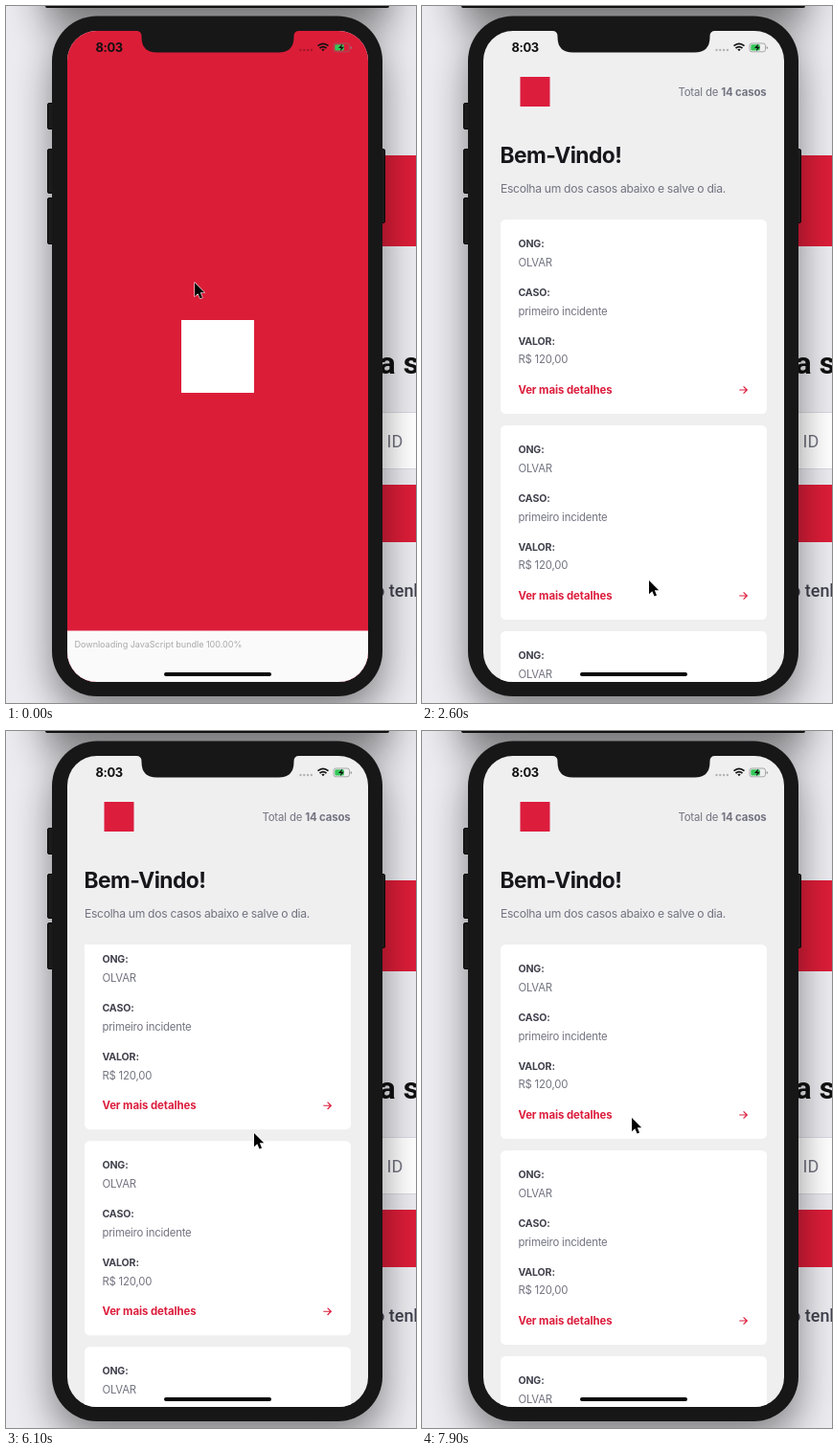
These frames come from a looping animation (428x728 px, 8000 ms). An HTML page:

```html
<!DOCTYPE html>
<html lang="pt">
<head>
<meta charset="utf-8">
<title>App de casos</title>
<style>
  html, body { margin: 0; width: 100%; height: 100%; overflow: hidden; background: #ebebf0; }
  svg { display: block; width: 428px; height: 728px; }
  text { font-family: Inter, "Noto Sans", sans-serif; white-space: pre; }
  .web { font-family: Roboto, sans-serif; }
  .label { font-size: 10.6px; font-weight: 700; letter-spacing: -.15px; fill: #41414d; }
  .value { font-size: 11.37px; letter-spacing: -.2px; fill: #737380; }
  .total { font-size: 11.37px; letter-spacing: -.14px; fill: #737380; text-anchor: end; }
  .link { font-size: 11.37px; font-weight: 700; letter-spacing: -.05px; fill: #dc1d3c; }
  .title { font-size: 22.75px; font-weight: 700; letter-spacing: -.55px; fill: #16161b; }
  .intro { font-size: 12.13px; letter-spacing: -.3px; fill: #737380; }
  .clock { font-size: 12.9px; font-weight: 700; letter-spacing: -.35px; fill: #111; }
  .note { font-size: 9.1px; letter-spacing: -.05px; fill: #a9a9a9; }
  .toast { text-anchor: middle; fill: #e4e4e4; }
</style>
</head>
<body>
<svg viewBox="0 0 428 728">
  <defs>
    <filter id="soft" x="-40%" y="-40%" width="180%" height="180%"><feGaussianBlur stdDeviation="20"/></filter>
    <clipPath id="screen"><rect x="64" y="26" width="314" height="680" rx="31"/></clipPath>
    <clipPath id="window"><rect x="64" y="223" width="314" height="483"/></clipPath>
  </defs>

  <!-- page behind the phone -->
  <rect width="428" height="728" fill="#ebebf0"/>
  <rect x="380" y="156" width="95" height="95" fill="#dc1d38"/>
  <text class="web" x="389.5" y="384" font-size="32" font-weight="700" fill="#111">a seu logon</text>
  <rect x="300" y="424.5" width="160" height="59" fill="#fff" stroke="#d8d8e0"/>
  <text class="web" x="397.5" y="461" font-size="18" fill="#737380">ID</text>
  <rect x="300" y="500" width="160" height="60" fill="#dc1d38"/>
  <text class="web" x="385" y="617" font-size="18" font-weight="500" fill="#41414d">o tenho cadastro</text>

  <!-- shadows of the window above and of the phone -->
  <rect x="41" y="-200" width="359" height="222" fill="#000" opacity=".5" filter="url(#soft)"/>
  <rect x="48" y="28" width="345" height="712" rx="47" fill="#000" opacity=".45" filter="url(#soft)"/>
  <rect x="41" y="-6" width="359" height="8" rx="2" fill="#111"/>

  <!-- phone body -->
  <g fill="#1b1b1c" stroke="#080808">
    <rect x="43.5" y="101.5" width="8" height="27" rx="1.5"/>
    <rect x="43.5" y="149.5" width="8" height="46" rx="1.5"/>
    <rect x="43.5" y="200.5" width="8" height="48" rx="1.5"/>
    <rect x="388" y="149.5" width="7.5" height="77" rx="1.5"/>
  </g>
  <rect x="48" y="10.5" width="345" height="710.5" rx="47" fill="#171718"/>

  <g clip-path="url(#screen)">
    <rect x="64" y="26" width="314" height="680" fill="#efeff0"/>
    <rect x="102.5" y="74" width="31" height="31" fill="#dc1d3c"/>
    <text class="total" x="359.5" y="94">Total de <tspan font-weight="700">14 casos</tspan></text>
    <text class="title" x="81.5" y="163.6">Bem-Vindo!</text>
    <text class="intro" x="82" y="194.5">Escolha um dos casos abaixo e salve o dia.</text>
    <g clip-path="url(#window)"><g id="list"></g></g>

    <g id="toast">
      <rect x="82" y="642" width="278" height="64" fill="#000" opacity=".77"/>
      <text class="toast" x="220.8" y="661" font-size="11.37" letter-spacing="-.2">Refreshed</text>
      <text class="toast" x="221" y="674" font-size="10.1">Don't see your changes? Reload the app</text>
    </g>

    <g id="splash">
      <rect x="64" y="26" width="314" height="680" fill="#dc1d38"/>
      <rect x="183" y="328" width="76" height="76" fill="#fff"/>
      <rect x="64" y="652.5" width="314" height="54" fill="#fafafa"/>
      <text class="note" x="71.5" y="670">Downloading JavaScript bundle 100.00%</text>
    </g>
    <rect id="home" x="165" y="696" width="112" height="4" rx="2"/>

    <!-- status bar -->
    <path d="M136 26q5.5 0 5.5 5.5v1q0 16 16 16h127q16 0 16-16v-1q0-5.500 5.5-5.500z" fill="#171718"/>
    <text class="clock" x="93.5" y="47.5">8:03</text>
    <g id="dots"></g>
    <path d="M325.5 41.7q5.5-4.600 11 0M327.5 44q3.5-2.900 7 0" fill="none" stroke="#111" stroke-width="1.7"/>
    <path d="M329.3 45.3L331 47.3L332.7 45.3q-1.700-1.300-3.400 0z" fill="#111"/>
    <rect x="342" y="39" width="16.5" height="8.8" rx="2.3" fill="none" stroke="#777" stroke-opacity=".75" stroke-width=".8"/>
    <path d="M359.7 42v3q1.2-.5 1.2-1.500t-1.200-1.500z" fill="#888"/>
    <rect x="343.3" y="40.3" width="9.5" height="6.2" rx="1.2" fill="#35c759"/>
    <path d="M351 39.5L347 44h2.7l-.8 3.3L353 42.8h-2.700z" fill="#111"/>
  </g>

  <path id="cursor" d="M0 0V14.2L3.3 11.2L5.6 16.4L8 15.4L5.8 10.3H10.2Z"
        stroke="#fff" stroke-width="1.1" stroke-linejoin="round" paint-order="stroke"/>
</svg>

<script>
  const LOOP = 8000, TICK = 100, CARDS = 5, PITCH = 215;
  const el = id => document.getElementById(id);
  const repeat = (n, draw) => Array.from({ length: n }, (_, i) => draw(i)).join("");

  const fields = { "ONG:": "OLVAR", "CASO:": "primeiro incidente", "VALOR:": "R$ 120,00" };
  const rows = Object.entries(fields).map(([label, value], i) => `
    <text class="label" x="100.4" y="${29 + 51 * i}">${label}</text>
    <text class="value" x="100.4" y="${48.6 + 50.9 * i}">${value}</text>`).join("");

  el("list").innerHTML = repeat(CARDS, i => `
    <g transform="translate(0 ${223 + i * PITCH})">
      <rect x="82" width="278" height="203" rx="5.5" fill="#fff"/>${rows}
      <text class="link" x="100.4" y="182">Ver mais detalhes</text>
      <path class="arrow" d="M331.3 178h8m-3.700-3.700l3.700 3.700l-3.700 3.700"
        fill="none" stroke="#dc1d3c" stroke-width="1.2"/>
    </g>`);
  el("dots").innerHTML = repeat(4, i =>
    `<circle cx="${307.5 + i * 3.8}" cy="46" r="1.2" opacity=".25"/>`);
  const arrows = document.querySelectorAll(".arrow");

  // Share of the steps from start to end already taken
  const progress = (t, start, end) =>
    Math.max(0, Math.min(1, (t - start + TICK) / (end - start + TICK)));
  const easeOut = p => 1 - (1 - p) ** 3;
  const smooth = p => p * p * (3 - 2 * p);

  // Pointer gestures; grip is how far the list moves per pixel of drag
  const gestures = [
    { start: 1300, end: 1400, x: 208, y: 314 },
    { start: 1600, end: 2300, x: 237, y: 600 },
    { start: 2900, end: 3000, x: 256, y: 393 },
    { start: 3400, end: 4100, x: 275, y: 309, grip: 2.71 },
    { start: 4300, end: 4300, x: 265, y: 462 },
    { start: 4600, end: 4800, x: 277, y: 305, grip: 1 },
    { start: 5400, end: 6100, x: 259, y: 420, grip: 3.26 },
    { start: 6300, end: 6700, x: 238, y: 688, grip: .17 },
    { start: 7300, end: 7900, x: 219, y: 404 }
  ];

  function pose(t) {
    let x = 197, y = 289, scroll = 0;
    for (const { start, end, x: toX, y: toY, grip = 0 } of gestures) {
      const p = (grip ? smooth : easeOut)(progress(t, start, end));
      const dy = (toY - y) * p;
      x += (toX - x) * p;
      y += dy;
      scroll -= grip * dy;
      if (p < 1) break;
    }
    const springBack = (1 - progress(t, 7000, 7900)) ** 1.5;
    return { x, y, scroll: scroll * springBack };
  }

  function render(time) {
    const t = Math.floor(time / TICK) * TICK;
    const { x, y, scroll } = pose(t);
    const gone = progress(t, 1900, 2300);
    el("list").setAttribute("transform", `translate(0 ${-scroll})`);
    el("cursor").setAttribute("transform", `translate(${x} ${y})`);
    el("splash").setAttribute("opacity", 1 - progress(t, 600, 900));
    el("toast").setAttribute("transform", `translate(0 ${64 * gone})`);
    el("toast").setAttribute("opacity", 1 - gone);
    el("home").setAttribute("fill", t >= 600 && gone < .5 ? "#484848" : "#050505");
    arrows.forEach(a => a.setAttribute("opacity", t >= 1600 ? 1 : 0));
  }

  const origin = performance.now();
  function loop() {
    render((performance.now() - origin) % LOOP);
    requestAnimationFrame(loop);
  }
  loop();
</script>
</body>
</html>
```
